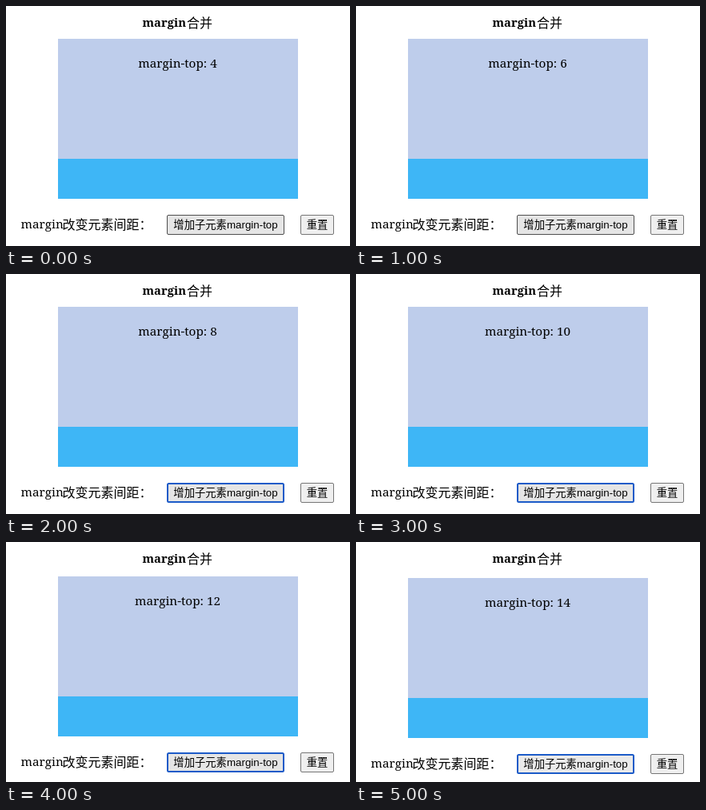
An HTML page for the animation above (6 s loop, 430 px wide and 300 px high).

```html
<!DOCTYPE html>
<html lang="zh-CN">
<head>
<meta charset="utf-8">
<style>
html, body { margin: 0; width: 100%; height: 100%; overflow: hidden; background: #fff; }
svg { display: block; width: 430px; height: 300px; }
text { fill: #000; white-space: pre; }
.serif { font: 500 15.3px "Noto Serif", serif; }
.bold { font: bold 14.8px "Noto Serif", serif; }
.cjk { font: 16px "Noto Sans CJK SC", "Noto Sans CJK", sans-serif; }
.cjk.heavy { font-weight: 500; }
.label { font: 13.33px "Liberation Sans", "Noto Sans CJK SC", "Noto Sans CJK", sans-serif; text-anchor: middle; }
</style>
</head>
<body>
<svg viewBox="0 0 430 300">
  <text class="bold" x="170.5" y="26">margin</text>
  <text class="cjk heavy" x="226" y="26.5">合并</text>
  <g id="content">
    <rect x="65" y="41" width="300" height="150" fill="#becdeb"/>
    <rect x="65" y="191" width="300" height="50" fill="#3eb6f6"/>
    <text id="readout" class="serif" x="214.5" y="77" text-anchor="middle"></text>
    <text class="serif" x="18.5" y="278">margin</text>
    <text class="cjk" x="70.5" y="278.5">改变元素间距：</text>
    <rect id="addButton"/>
    <text class="label" x="274.5" y="278">增加子元素margin-top</text>
    <rect x="368.5" y="261.5" width="41" height="24" rx="1.5" fill="#efefef" stroke="#767676"/>
    <text class="label" x="389" y="278">重置</text>
  </g>
</svg>
<script>
const STEP = 1000;
const steps = [
  { margin: 4, shift: 0, focus: false },
  { margin: 6, shift: 0, focus: false },
  { margin: 8, shift: 0, focus: true },
  { margin: 10, shift: 0, focus: true },
  { margin: 12, shift: 2, focus: true },
  { margin: 14, shift: 4, focus: true, fill: "#eaeaea" }
];
const [content, readout, addButton] =
  ["content", "readout", "addButton"].map(id => document.getElementById(id));

function setAttributes(node, values) {
  for (const name in values) node.setAttribute(name, values[name]);
}

function styleButton(focus, fill = "#e5e5e5") {
  const line = focus ? 2 : 1;
  setAttributes(addButton, {
    x: 201 + line / 2, y: 261 + line / 2,
    width: 147 - line, height: 25 - line, rx: 1.5,
    fill, stroke: focus ? "#1c5bc8" : "#4f4f4f", "stroke-width": line
  });
}

let shown = -1;
function draw(now) {
  const index = Math.floor(now / STEP) % steps.length;
  if (index !== shown) {
    const { margin, shift, focus, fill } = steps[index];
    readout.textContent = `margin-top: ${margin}`;
    content.setAttribute("transform", `translate(0 ${shift})`);
    styleButton(focus, fill);
    shown = index;
  }
}

const start = performance.now();
function tick() {
  draw(performance.now() - start);
  requestAnimationFrame(tick);
}
tick();
</script>
</body>
</html>
```
